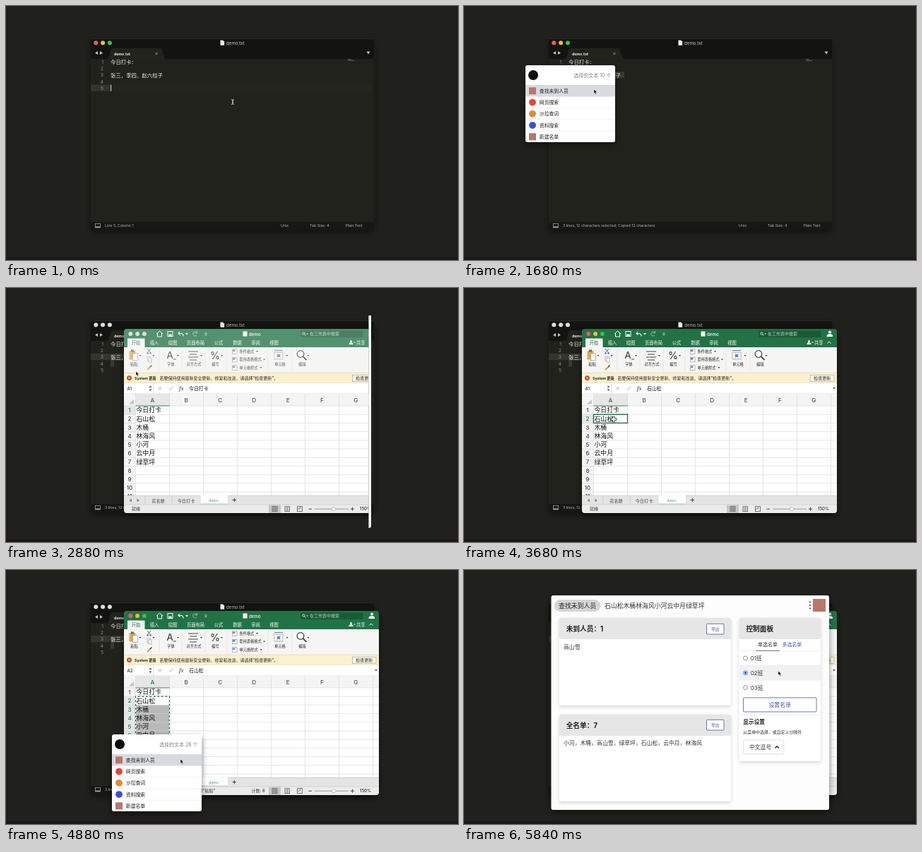
An HTML page that plays this animation: 640 px wide and 360 px high, repeating every 6.72 s.

```html
<!DOCTYPE html>
<html lang="zh">
<head>
<meta charset="utf-8">
<title>demo</title>
<style>
html, body { margin: 0; width: 100%; height: 100%; overflow: hidden; background: #20211c; }
svg { display: block; width: 100vw; height: 100vh; }
text { font-family: Inter, "Noto Sans CJK SC", "Noto Sans CJK", sans-serif; white-space: pre; }
#book text { font-weight: 500; }
</style>
</head>
<body>
<svg id="stage" viewBox="0 0 640 360"></svg>
<script>
const LOOP = 6720, STEP = 80;
const BLUE = '#4256b8', GREEN = '#217346', AVATAR = '#b5786a';

const rect = (x, y, w, h, fill, more = '') =>
  `<rect x="${x}" y="${y}" width="${w}" height="${h}" fill="${fill}" ${more}/>`;
const dot = (x, y, r, fill, more = '') =>
  `<circle cx="${x}" cy="${y}" r="${r}" fill="${fill}" ${more}/>`;
const fill = (d, color, more = '') => `<path d="${d}" fill="${color}" ${more}/>`;
const line = (d, color, w = 1, more = '') =>
  `<path d="${d}" fill="none" stroke="${color}" stroke-width="${w}" ${more}/>`;
// y is the vertical middle of the text
const text = (s, x, y, size, color, more = '') =>
  `<text x="${x}" y="${(y + size * 0.37).toFixed(2)}" font-size="${size}" fill="${color}" ${more}>${s}</text>`;
const mid = 'text-anchor="middle"', end = 'text-anchor="end"';
const bold = 'style="font-weight:700"', semi = 'font-weight="500"';
const group = (id, body, more = '') => `<g id="${id}" ${more}>${body}</g>`;
const range = n => [...Array(n).keys()];

const staff = ['石山松', '木桶', '林海风', '小河', '云中月', '绿草坪'];
const roll = '张三，李四、赵六柱子';
const TOOL = '未到人员';

function editor() {
  const rowY = i => 79.3 + i * 9.25;
  let s = rect(120, 46, 401, 271, '#20211c', 'rx="3" filter="url(#shadow)"');
  s += rect(120, 46, 401, 29, '#131411', 'rx="3"') + rect(120.5, 46, 400, 0.6, '#383934');
  s += fill('M142 75 Q145 75 146 70 L148 63 Q149 60 152 60 H217 Q220 60 221 63 L224 72 Q225 75 228 75Z', '#22231e');
  s += range(3).map(i => dot(127.3 + i * 9.8, 52.3, 3, '#fff', `id="light${i}"`)).join('');
  s += fill('M303.5 48.5h3.6l2 2v5.2h-5.6z', '#eee');
  s += text('demo.txt', 312, 52.3, 6.2, '#c9c9c5', 'id="title"');
  s += fill('M130 64v5l-4-2.500zM133 64v5l4-2.500zM510.500 64.500h5l-2.500 4z', '#c4c5bf');
  s += text('demo.txt', 153, 67.6, 5.2, '#f2f2ee', bold) + line('M211.500 66l3 3m0-3l-3 3', '#a5a6a0', 0.8);
  s += rect(120, 111.5, 27.5, 9.3, '#34352d', 'id="gutter"');
  s += rect(147.5, 111.5, 373, 9.3, '#24251f', 'id="lineMark"');
  s += rect(148, 93, 0, 9.3, '#383932', 'id="sel3"') + rect(148, 102.3, 5, 9.3, '#383932', 'id="sel4"');
  s += range(5).map(i => text(i + 1, 138, rowY(i), 6.8, '#8d8e84', end)).join('');
  s += text('今日打卡：', 148, rowY(0), 7.4, '#f4f4ee') + text(roll, 148, rowY(2), 7.4, '#f4f4ee');
  s += rect(148.2, 111.5, 0.9, 9.3, '#f0f0ea', 'id="caret"');
  s += line('M484 75.600h4.500M484 77.300h9', '#77786f', 0.8);
  s += rect(120, 306, 401, 11, '#171815', 'rx="2"');
  s += rect(126.5, 308.5, 7, 5.5, 'none', 'stroke="#aaa" stroke-width=".7"') + rect(126.5, 312.5, 7, 1.5, '#aaa');
  s += text('', 140, 311.5, 5.25, '#b9bab4', 'id="info"');
  [['Unix', 389], ['Tab Size: 4', 430], ['Plain Text', 480.5]].forEach(([a, x]) =>
    s += text(a, x, 311.5, 5.25, '#b9bab4'));
  return s;
}

function ribbon() {
  const dim = '#444', label = (s, x, y = 108.5, more = mid) => text(s, x, y, 5.2, '#222', more);
  const thin = 'stroke="#888" stroke-width=".6"';
  let s = rect(167, 84, 361, 36, '#f5f5f4');
  s += rect(174.5, 89, 9, 12.5, '#e3a74c', 'rx="1"') + rect(177, 87.5, 4, 3, '#666') + rect(179.5, 93, 7, 9.5, '#fff', thin);
  s += line('M200 86l5 6m0-6l-5 6', dim, 0.8) + dot(200.5, 92.5, 1.2, '#4472c4') + dot(204.5, 92.5, 1.2, '#4472c4');
  s += rect(200, 97, 4, 6, '#fff', thin) + rect(202, 99, 4, 6, '#fff', thin);
  s += line('M200 116l5-5', '#d8a24a', 2) + line('M204 112l2.500-2.500', dim, 1.4);
  s += text('A', 232, 95.5, 13, '#444', mid) + line('M237 101h4', dim, 1);
  s += line('M258 90h14M260 94h10M258 98h14M260 102h10', dim, 1);
  s += text('%', 296, 96, 14, '#444', mid);
  [90, 101.5, 113].forEach((y, i) => {
    s += rect(320.5, y - 3.2, 6.5, 6.5, '#fff', thin);
    s += rect(321, y - 2.5, 3.5, 2.6, ['#d66b61', '#5b8bd0', '#5b9bd5'][i]);
    s += label(['条件格式', '套用表格格式', '单元格样式'][i], 330.5, y, '');
    s += fill(`M${[354, 364, 359.5][i]} ${y - 1}h3l-1.500 2z`, dim);
  });
  s += rect(380, 91, 12, 10, '#fff', thin) + rect(384, 94, 4, 4, '#4b8ed0') + line('M380 88.500h12', '#4472c4', 0.9) + line('M384 91v10M388 91v10', '#999', 0.6);
  s += dot(417, 93.5, 4.8, '#fff', 'stroke="#444" stroke-width="1.3"') + line('M420.500 97l5 5', dim, 1.8);
  [['粘贴', 181.5], ['字体', 233.5], ['对齐方式', 266], ['编号', 296.5], ['单元格', 388], ['编辑', 419.5]].forEach(([a, x]) =>
    s += label(a, x));
  s += [190, 209, 243.5, 276.5, 305.5, 398, 428].map(x => fill(`M${x - 1.5} 95h3l-1.500 2z`, dim)).join('');
  s += line('M217 87v30M249 87v30M282 87v30M313 87v30M371 87v30M405 87v30', '#e2e1df', 0.7);
  return s;
}

const rowTop = i => 167 + i * 12.2;

function sheet() {
  let s = rect(167, 150, 361, 145, '#fff') + rect(167, 150, 361, 17, '#f4f4f4');
  s += rect(167, 167, 16.5, 128, '#f4f4f4') + rect(183.5, 150, 48, 17, '#e6e6e6');
  s += rect(167, 167, 16.5, 12.2, '#e6e6e6', 'id="rowMark"');
  s += rect(183.5, rowTop(2), 48, 0, '#b9b9b9', 'id="shade"');
  s += line(range(8).map(i => `M${183.5 + i * 48} 150V295`).join('') +
    range(12).map(i => `M167 ${rowTop(i)}H528`).join(''), '#d6d6d6', 0.6);
  s += line('M183.500 167h48', GREEN, 0.8) + fill('M181 158v6.500h-7z', '#c4c4c4');
  s += [...'ABCDEFG'].map((c, i) => text(c, 207.3 + i * 48, 159, 8.2, i ? '#555' : GREEN, mid)).join('');
  s += range(11).map(i => text(i + 1, 175, rowTop(i) + 6.2, 8, '#444', `${mid} class="num"`)).join('');
  s += ['今日打卡', ...staff].map((a, i) => text(a, 184.5, rowTop(i) + 6.2, 8.9, '#111')).join('');
  s += rect(183.5, 167, 48, 12.2, 'none', 'id="frame" stroke="#217346" stroke-width="1.4"');
  s += rect(183.5, rowTop(1), 48, 73.2, 'none', 'id="ants" stroke="#fff" stroke-width="1.5" stroke-dasharray="3 2.500"');
  return s;
}

function workbook() {
  const W = '#fff';
  let s = rect(167, 58, 361, 26, GREEN);
  s += line('M213 65l4.500-4 4.500 4M214.500 64v5h6v-5', W, 1) + rect(229, 61.500, 7, 7, 'none', 'stroke="#fff"') + rect(230.5, 65.5, 4, 3, W);
  s += line('M246 62l-2 2.500 2.500 2M244 64.500h4q3 0 3 4', W, 1.1) + fill('M254 64h4l-2 2.500z', W);
  s += line('M270 63a3 3 0 1 0 0 4M270.500 61v3h-3', '#8fb9a2', 1) + line('M281.500 64h3M281.500 65.500l1.500 1.500 1.500-1.500', W, 0.8);
  s += rect(335.5, 61.5, 6, 7, W) + text('demo', 344, 65.3, 6.2, W);
  s += rect(417, 60.5, 88.5, 9.4, '#195a36', 'rx="1.500"') + dot(421.500, 64.500, 1.700, 'none', 'stroke="#fff" stroke-width=".8"');
  s += line('M423 66l1.500 1.500', W, 0.8) + fill('M425.500 64.500h2.500l-1.250 1.500z', W) + text('在工作表中搜索', 430, 65.2, 6, '#c4d9cd');
  s += dot(518, 62.5, 2, W) + fill('M513.500 69q0-4 4.500-4t4 4z', W);
  s += rect(172, 71.5, 24.5, 13, '#f5f5f4');
  ['开始', '插入', '绘图', '页面布局', '公式', '数据', '审阅', '视图'].forEach((a, i) =>
    s += text(a, [184, 210, 236, 268.5, 301, 327.5, 353.5, 379.5][i], 77.2, 6.3, i ? W : GREEN, mid));
  s += dot(488.5, 75.5, 1.6, W) + fill('M485.500 80q0-3 3-3t3 3z', W) + line('M492 77h3', W, 0.8);
  s += text('共享', 496, 77.2, 6.3, W) + line('M514.500 78.500l2.500-2.500 2.500 2.500', W, 1);
  s += ribbon();
  s += group('veil', rect(167, 58, 361, 26, W, 'opacity=".22"') + rect(167, 85, 361, 35, '#f5f5f4', 'opacity=".28"'));
  s += range(3).map(i => dot(176.3 + i * 9.8, 65, 2.9, W, `id="xl${i}"`)).join('');
  s += rect(167, 120, 361, 15, '#fcf0cd') + line('M167 120.200h361M167 135h361', '#d8cfb4', 0.6);
  s += dot(174.5, 127.6, 3.4, '#b5472f') + line('M173 126l3 3m0-3l-3 3', W, 0.9);
  s += text('System 更新', 182, 127.6, 5.2, '#222', bold);
  s += text('若要保持使用最新安全更新、修复和改进，请选择“检查更新”。', 217.5, 127.6, 6, '#222');
  s += rect(490.5, 123.2, 33.5, 9, '#fdf8e8', 'stroke="#999" stroke-width=".6"') + text('检查更新', 507.2, 127.6, 6, '#222', mid);
  s += rect(167, 135, 361, 15, W) + text('A1', 171.5, 142.3, 6, '#222', 'id="cell"');
  s += fill('M202.500 141h4l-2-2.500zM202.500 143.500h4l-2 2.500zM522 141h4l-2 2.500z', '#555') + line('M208.500 135v15M167 150h361', '#ccc', 0.6);
  s += line('M215.500 140l4.500 4.500m0-4.500l-4.500 4.500M230.500 142.500l2 2 4-5', '#aaa', 0.9);
  s += text('fx', 245, 142.2, 7.5, '#333', 'style="font-family:\'Noto Serif\',serif;font-style:italic"');
  s += text('', 259, 142.3, 6.9, '#111', 'id="formula"');
  s += sheet();
  s += rect(167, 294, 361, 13, '#e4e4e4') + line('M167 294.300h361M197 295v12M235 295v12M275.500 295v12', '#bdbdbd', 0.6);
  s += fill('M178 298.500v5l-3.500-2.500zM185.500 298.500v5l3.500-2.500z', '#888');
  s += text('花名册', 215.5, 301.3, 6.2, '#444', mid) + text('今日打卡', 255, 301.3, 6.2, '#444', mid);
  s += rect(275.5, 294, 38.5, 12, W) + line('M276 306h38', '#8fbfa5', 0.7);
  s += text('demo', 294, 301, 5, '#4f9a74', mid + ' style="font-family:\'Noto Serif\',serif"') + line('M320.500 300.500h5.500M323.250 297.800v5.500', '#333', 0.9);
  s += rect(167, 307, 361, 12, '#ebebeb') + line('M167 307h361', '#c4c4c4', 0.6);
  s += text('就绪', 178, 313.2, 6, '#333', 'id="ready"') + text('计数: 6', 347.5, 313.2, 6, '#333', 'id="count"');
  s += rect(372, 307.5, 17, 11.5, '#c6c6c6');
  s += rect(377, 309.7, 7, 7, 'none', 'stroke="#555" stroke-width=".7"') + line('M377 312h7M377 314.400h7M379.300 309.700v7M381.700 309.700v7', '#555', 0.6);
  s += rect(395, 309.7, 6.5, 7, 'none', 'stroke="#555" stroke-width=".8"') + line('M396.500 311.500h3.500M396.500 313.200h3.500M396.500 315h3.500', '#555', 0.7);
  s += rect(412.5, 309.7, 7, 7, 'none', 'stroke="#555" stroke-width=".8"') + line('M412.500 313h4v-3', '#555', 0.7);
  s += line('M428.500 313.200h4.500M488 313.200h5M490.500 310.700v5', '#444', 1) + line('M437 313.200h48', '#999', 1) + dot(464, 313.2, 2.6, '#fff', 'stroke="#999" stroke-width=".6"');
  s += text('150%', 501, 313.2, 6, '#333');
  return rect(167, 58, 361, 261, '#333', 'rx="4" filter="url(#shadow)"') + `<g clip-path="url(#bookClip)">${s}</g>`;
}

function popup() {
  let s = rect(87, 84, 127, 109, '#fff', 'rx="3" filter="url(#shadow)"') + dot(98, 98, 7, '#0b0b0b');
  s += text('', 208.5, 98, 7, '#808080', end + ' id="picked"') + rect(87, 112, 127, 16.3, '#d7dbe0', 'id="hover"');
  ['查找' + TOOL, '网页搜索', '沙拉查词', '资料搜索', '新建名单'].forEach((a, i) => {
    const y = 120.3 + i * 16.25;
    s += i % 4 ? dot(97, y, 4.9, ['#ea4335', '#e08a35', '#3850d8'][i - 1]) : rect(92, y - 5, 10, 10, AVATAR);
    s += text(a, 106.8, y, 6.85, '#1c1c1c', semi);
    if (i) s += line(`M87 ${y - 8.1}h127`, '#e7e7e7', 0.6);
  });
  return s;
}

function panel() {
  const card = (x, y, w, h, title, id) => rect(x, y, w, h, '#fff', 'rx="2" filter="url(#soft)"') +
    rect(x, y, w, 30, '#e6e6e6', 'rx="2"') + text(title, x + 9.7, y + 15.6, 9.7, '#222', `${bold} id="${id}"`);
  const outline = (x, y, w, h, label, size) => rect(x, y, w, h, '#fff', `rx="1" stroke="${BLUE}" stroke-width=".8"`) +
    text(label, x + w / 2, y + h / 2, size, BLUE, mid);
  let s = card(135, 68, 243, 124, '', 'missing') + outline(343.5, 76.3, 24.5, 14.7, '导出', 5.8);
  s += text('', 141, 109, 7.85, '#333', 'id="missText"');
  s += card(135, 205, 243, 123, '', 'all') + outline(343.5, 212.3, 24.5, 14.7, '导出', 5.8);
  s += text('', 141, 245, 7.85, '#333', 'id="allText"');
  s += card(389.7, 68, 115.3, 203, '控制面板', 'control');
  s += text('单选名单', 416, 105.3, 6.95, '#333') + text('多选名单', 450.5, 105.3, 6.95, BLUE);
  s += rect(389.7, 135.5, 115.3, 20.5, '#f1f1f1', 'id="rowHover"');
  s += line('M390 114.600h115M390 135.300h115M390 156h115M390 205.500h115', '#e9e9e9', 0.7) + line('M413 114.400h34', '#555', 0.8);
  range(3).forEach(i => {
    const y = 125 + i * 20.8;
    s += dot(398.6, y, 3, '#fff', `id="ring${i}" stroke-width=".8"`) + dot(398.6, y, 1.8, '#1a66d6', `id="pip${i}"`);
    s += text(`0${i + 1}班`, 405.7, y, 7.9, '#333');
  });
  s += outline(395.5, 181, 103.5, 20, '设置名单', 7.9);
  s += text('显示设置', 395.3, 215.6, 7.7, '#222', bold) + text('从菜单中选择，或自定义分隔符', 395.3, 230.3, 5.93, '#333');
  s += rect(395.6, 241, 57.2, 20, '#fff', 'rx="1" stroke="#dadada" stroke-width=".8"') + text('中文逗号', 404, 251, 7.8, '#333');
  s += line('M440.500 252.500l2.700-2.700 2.700 2.700', '#222', 1.4);
  return rect(123.5, 36, 393.5, 304, '#fdfdfd', 'rx="3" filter="url(#shadow)"') +
    rect(128, 42, 65.3, 17, '#d5d5d5', 'rx="8.500"') + text('查找' + TOOL, 160.6, 50.4, 8.85, '#222', mid + ' ' + semi) +
    text('', 199, 50.4, 8.85, '#333', 'id="query"') +
    [45.5, 50, 54.500].map(y => dot(490, y, 1.1, '#444')).join('') + rect(494, 41, 18, 18, AVATAR) + group('cards', s);
}

const svg = document.getElementById('stage');
svg.innerHTML = `<defs>
  <filter id="shadow" x="-20%" y="-20%" width="140%" height="150%"><feDropShadow dx="0" dy="4" stdDeviation="5" flood-opacity=".45"/></filter>
  <filter id="soft" x="-10%" y="-10%" width="120%" height="130%"><feDropShadow dx="0" dy="2" stdDeviation="2.500" flood-opacity=".16"/></filter>
  <clipPath id="bookClip"><rect x="167" y="58" width="361" height="261" rx="4"/></clipPath>
  <clipPath id="before"><rect width="513.500" height="360"/></clipPath>
  <clipPath id="after"><rect x="513.500" y="39" width="3.500" height="301"/></clipPath></defs>` +
  rect(0, 0, 640, 360, '#20211c') + rect(0, 356, 640, 4, '#1d1719') +
  group('editor', editor()) + group('book', workbook()) + group('popup', popup()) + group('panel', panel()) +
  group('beam', line('M-2-3.500q2 0 2 1.500v4q0 1.500-2 1.500M2-3.500q-2 0-2 1.500v4q0 1.500 2 1.500', '#d5d5d0', 0.9)) +
  group('cross', fill('M-1.300-4h2.600v2.700h2.700v2.600h-2.700v2.700h-2.600v-2.700h-2.700v-2.600h2.700z', '#fff', 'stroke="#222" stroke-width=".8"')) +
  group('arrow', fill('M0 0v6.200l1.400-1.300 1.100 2.400 1.100-.500-1-2.300h1.900z', '#000', 'stroke="#fff" stroke-width=".5"'));

const el = Object.fromEntries([...svg.querySelectorAll('[id]')].map(n => [n.id, n]));
const nums = [...svg.querySelectorAll('.num')];
const set = (id, attrs) => Object.entries(attrs).forEach(([k, v]) => el[id].setAttribute(k, v));
const show = (id, on) => set(id, { visibility: on ? 'visible' : 'hidden' });
const say = (id, s) => { el[id].textContent = s; };
const clamp = v => Math.max(0, Math.min(1, v));

// time, x, y
const route = [[0, 321, 136], [80, 315, 135], [480, 216, 117], [720, 218, 98], [960, 148, 98], [1200, 148, 98],
  [1600, 184, 118], [2880, 184, 118], [3520, 212, 186], [3680, 212, 186], [4160, 212, 246], [4320, 212, 246],
  [4800, 247, 268], [5040, 247, 268], [5600, 445, 143], [LOOP, 445, 143]];
const DROP = 960;

function pointer(t) {
  const i = route.findIndex(k => k[0] > t), [t0, x0, y0] = route[i - 1], [t1, x1, y1] = route[i];
  const u = (t - t0) / (t1 - t0), e = u * u * (3 - 2 * u);
  return [x0 + (x1 - x0) * e, y0 + (y1 - y0) * e];
}

function lights(prefix, active) {
  ['#f25e57', '#f6bd30', '#35c649'].forEach((c, i) => set(prefix + i, { fill: active ? c : '#dedede' }));
}

function drawEditor(t) {
  const drag = t >= 560, full = t >= 720;
  const [x] = pointer(Math.min(t, DROP));
  const head = full ? Math.round(clamp((x - 148) / 74) * 10) : 10;
  const left = 148 + head * 7.4, row = full ? 93 : drag ? 102.3 : 111.5;
  set('sel3', { x: left, width: full ? 227 - left : 0 });
  show('sel4', drag);
  set('gutter', { y: row });
  set('lineMark', { y: row });
  show('lineMark', !drag);
  set('caret', { x: full ? left : 148.2, y: row });
  show('caret', t < 1200);
  say('info', !drag ? 'Line 5, Column 1' : !full ? '2 lines, 1 character selected' :
    `3 lines, ${12 - head} characters selected` + (t >= 1200 ? '; Copied 12 characters' : ''));
  lights('light', t < 1840);
  set('title', { opacity: t < 1840 ? 1 : 0.9 });
}

function drawBook(t, y) {
  const active = t >= 3200, copied = t >= 4240;
  const from = t < 3600 ? 0 : 1;
  const to = t < 3600 ? 0 : t >= 4160 ? 6 : Math.max(1, Math.min(6, Math.floor((y - 167) / 12.2)));
  const h = (to - from + 1) * 12.2;
  show('veil', !active);
  lights('xl', active);
  set('rowMark', { y: rowTop(from), height: h });
  set('shade', { height: (to - from) * 12.2 });
  set('frame', { y: rowTop(from), height: h, opacity: active ? 1 : 0 });
  set('ants', { opacity: copied ? 1 : 0, 'stroke-dashoffset': -t / 80 });
  nums.forEach((n, i) => n.setAttribute('fill', i >= from && i <= to ? GREEN : '#444'));
  say('cell', t < 3760 ? 'A1' : 'A2');
  say('formula', from ? staff[0] : '今日打卡');
  say('ready', copied ? '选定目标区域，然后按 ENTER 或选择“粘贴”' : '就绪');
  set('count', { opacity: to > from ? 1 : 0 });
}

function drawPanel(t, x, y) {
  const second = t >= 4960, done = t >= 5760, pick = done ? 1 : 0;
  say('query', second ? staff.join('') : roll);
  say('missing', `${TOOL}：${second && !done ? 4 : 1}`);
  say('all', `全名单：${done ? 7 : 4}`);
  const team = '李四，王五，张三，赵六柱子';
  say('missText', done ? '高山雪' : second ? team : '王五');
  say('allText', done ? '小河，木桶，高山雪，绿草坪，石山松，云中月，林海风' : team);
  range(3).forEach(i => {
    set('ring' + i, { stroke: i === pick ? '#1a66d6' : '#777' });
    show('pip' + i, i === pick);
  });
  set('rowHover', { opacity: second && x > 390 && y > 135 && y < 156 ? 1 : 0 });
  set('cards', { opacity: clamp((t - (second ? 4880 : 1760)) / 240) });
}

function draw(t) {
  const [x, y] = pointer(t);
  const wipe = t >= 2880 && t < 2960;
  const panelOn = (t >= 1840 && t < 2960) || t >= 4960;
  const firstPop = t >= 1200 && t < 1840, nextPop = t >= 4320 && t < 4960;
  drawEditor(t);
  drawBook(t, y);
  drawPanel(t, x, y);
  el.book.style.display = t >= 2880 ? '' : 'none';
  el.panel.style.display = panelOn ? '' : 'none';
  el.popup.style.display = firstPop || nextPop ? '' : 'none';
  set('book', { 'clip-path': wipe ? 'url(#before)' : 'none' });
  set('panel', { 'clip-path': wipe ? 'url(#after)' : 'none' });
  set('popup', { transform: nextPop ? 'translate(63 149)' : '' });
  say('picked', `选择的文本 ${nextPop ? 26 : 10} 个`);
  set('hover', { opacity: y >= (nextPop ? 261 : 112) ? 1 : 0 });
  const shape = t < 1200 ? 'beam' : t >= 2960 && t < 4320 && y > 167 ? 'cross' : 'arrow';
  ['beam', 'cross', 'arrow'].forEach(id => {
    show(id, id === shape);
    set(id, { transform: `translate(${x.toFixed(2)} ${y.toFixed(2)})` });
  });
}

const start = performance.now();
let last = -1;
function tick() {
  const t = Math.floor(((performance.now() - start) % LOOP) / STEP) * STEP;
  if (t !== last) draw(last = t);
  requestAnimationFrame(tick);
}
tick();
</script>
</body>
</html>
```
